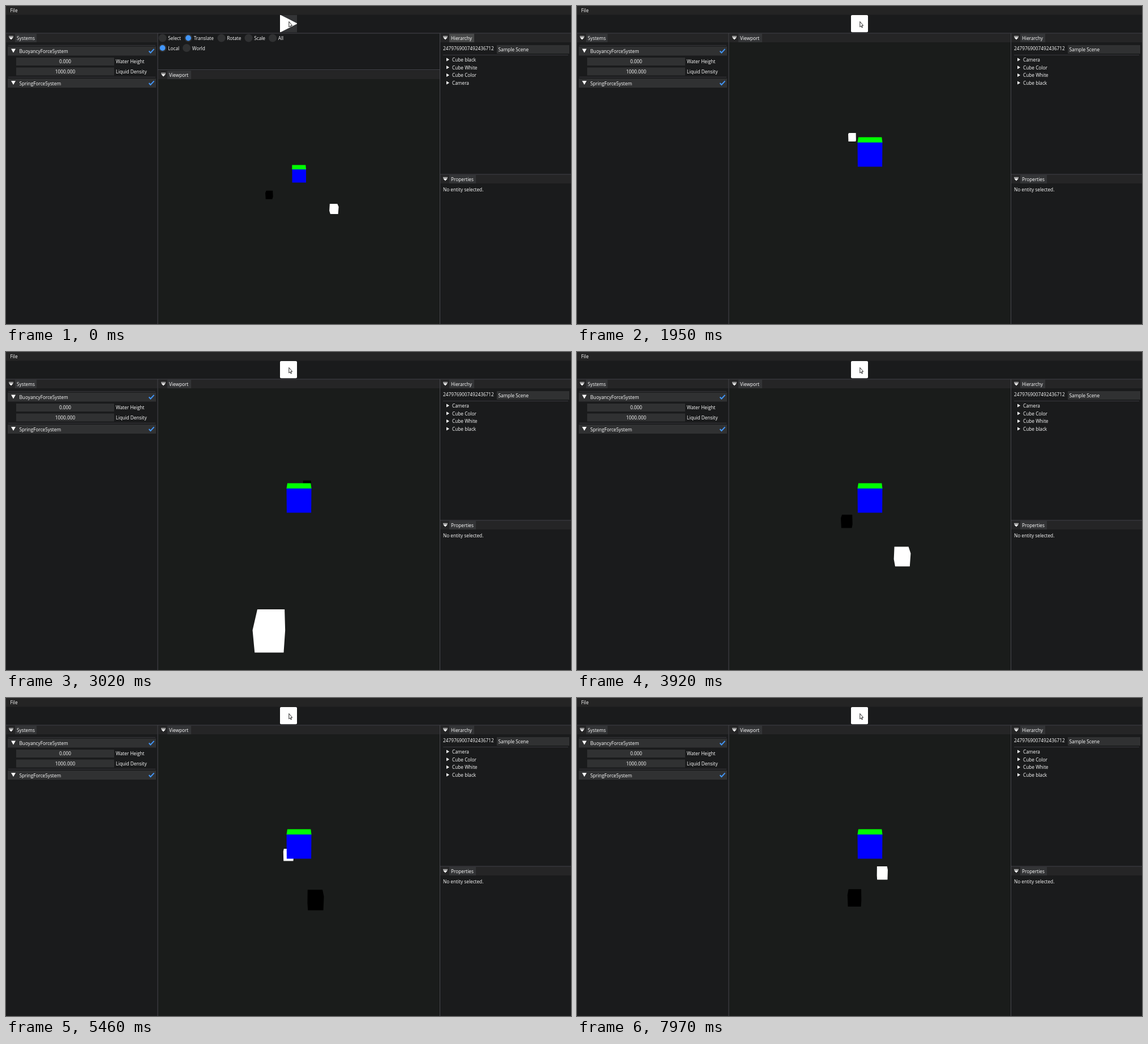
An HTML page with a canvas that plays this animation: 998 px wide and 561 px high, repeating every 8000 ms.

```html
<!DOCTYPE html>
<html>
<head>
<meta charset="utf-8">
<title>Scene editor</title>
<style>
  html, body { margin: 0; width: 100%; height: 100%; overflow: hidden; background: #1a1b1c; }
  canvas { display: block; }
</style>
</head>
<body>
<canvas id="stage" width="998" height="561"></canvas>
<script>
const ctx = document.getElementById('stage').getContext('2d');
const LOOP = 8, PLAY_AT = 0.7;
const PANEL = '#1a1b1c', BAR = '#252526', TAB = '#333436', TAB_FOCUS = '#474848', FRAME = '#303132';
const LINE = '#47474d', RULE = '#38383d', BLUE = '#4296fa', VIEW = '#1a1c1b';

// ---------- drawing helpers ----------
function rect(x, y, w, h, color) {
  ctx.fillStyle = color;
  ctx.fillRect(x, y, w, h);
}
function trace(points) {
  points.forEach(([x, y], i) => i ? ctx.lineTo(x, y) : ctx.moveTo(x, y));
  ctx.closePath();
}
function poly(points, color) {
  ctx.fillStyle = color;
  ctx.beginPath();
  trace(points);
  ctx.fill();
}
function disc(x, y, r, color) {
  ctx.fillStyle = color;
  ctx.beginPath();
  ctx.arc(x, y, r, 0, 7);
  ctx.fill();
}
function label(text, x, midY, align = 'left') {
  ctx.font = '8.28px "Open Sans", "Noto Sans", sans-serif';
  ctx.textAlign = align;
  ctx.fillStyle = '#fff';
  ctx.fillText(text, x, midY + 3);
}
const arrowDown = (x, y) => poly([[x - 4, y - 3.5], [x + 4, y - 3.5], [x, y + 3.5]], '#fff');
const arrowRight = (x, y) => poly([[x - 2, y - 3], [x + 3, y], [x - 2, y + 3]], '#fff');

function titleBar(x, y, w, text, tabWidth, tabColor = TAB) {
  rect(x, y, w, 15, BAR);
  rect(x + 16, y, tabWidth, 15, tabColor);
  rect(x + 5, y + 4, 8, 1, '#fff');
  poly([[x + 5, y + 6], [x + 13, y + 6], [x + 9, y + 10.5]], '#fff');
  label(text, x + 19, y + 8);
}
function header(y, text) {
  rect(3, y, 262, 16, FRAME);
  arrowDown(13, y + 7.5);
  label(text, 23.5, y + 8.5);
  ctx.strokeStyle = BLUE;
  ctx.lineWidth = 1.9;
  ctx.beginPath();
  ctx.moveTo(252.5, y + 8);
  ctx.lineTo(255.3, y + 11);
  ctx.lineTo(261.5, y + 4.3);
  ctx.stroke();
}
function field(y, value, name) {
  rect(18, y, 173, 14, FRAME);
  label(value, 104.5, y + 7.2, 'center');
  label(name, 194, y + 7.2);
}
function radio(x, y, text, on) {
  disc(x, y, 7, FRAME);
  if (on) disc(x, y, 4.9, BLUE);
  label(text, x + 9.7, y + 0.5);
}

// ---------- editor panels ----------
function drawPanels(playing) {
  rect(0, 0, 998, 561, PANEL);
  rect(0, 0, 998, 15.5, '#242424');
  label('File', 7.5, 8.3);

  titleBar(0, 49, 268, 'Systems', 38);
  rect(4, 69, 260, 1, RULE);
  header(71.5, 'BuoyancyForceSystem');
  field(91, '0.000', 'Water Height');
  field(108.5, '1000.000', 'Liquid Density');
  rect(4, 125, 260, 1, RULE);
  header(128, 'SpringForceSystem');

  titleBar(767, 49, 231, 'Hierarchy', 44, playing ? TAB : TAB_FOCUS);
  label('2479769007492436712', 772, 75);
  rect(867, 69, 128, 15, FRAME);
  label('Sample Scene', 869.5, 77);
  rect(772, 86, 221, 1, RULE);
  const items = ['Cube black', 'Cube White', 'Cube Color', 'Camera'];
  if (playing) items.reverse();
  items.forEach((name, i) => {
    arrowRight(780, 94.5 + i * 13.7);
    label(name, 788, 95 + i * 13.7);
  });
  titleBar(767, 298, 231, 'Properties', 47);
  label('No entity selected.', 772, 324.3);

  if (playing) {
    rect(269, 49, 498, 512, VIEW);
    titleBar(269, 49, 498, 'Viewport', 42);
  } else {
    radio(276.5, 56.5, 'Select');
    radio(322, 56.5, 'Translate', true);
    radio(380.5, 56.5, 'Rotate');
    radio(428.5, 56.5, 'Scale');
    radio(471, 56.5, 'All');
    radio(276.5, 74, 'Local', true);
    radio(319, 74, 'World');
    rect(269, 114, 498, 447, VIEW);
    titleBar(269, 114, 498, 'Viewport', 42);
    rect(268, 112, 499, 1, LINE);
  }
  rect(0, 47.5, 998, 1, LINE);
  rect(767, 296.5, 231, 1, LINE);
  rect(267.5, 48, 1, 513, LINE);
  rect(766, 48, 1, 513, LINE);
}

function drawPlayButton(playing) {
  if (playing) {
    ctx.fillStyle = '#fff';
    ctx.beginPath();
    ctx.roundRect(484, 16, 30, 30.3, 2);
    ctx.fill();
  } else {
    rect(484, 16, 30, 30.3, TAB);
    poly([[484, 16], [485.5, 16], [514, 30.5], [514, 31.5], [485.5, 46], [484, 46]], '#fff');
  }
  poly([[499.8, 27.5], [499.8, 37], [501.8, 35.2], [503.2, 38.2], [504.4, 37.6], [503.1, 34.7], [505.6, 34.4]], '#fff');
  ctx.strokeStyle = '#111';
  ctx.lineWidth = 0.9;
  ctx.stroke();
}

// ---------- motion: two cubes swing opposite each other round a bobbing centre ----------
// Half turns since `start`, the first lasting about `step` seconds and later ones longer.
function halfTurns(t, start, step, slowing) {
  return (Math.sqrt(step * step + 4 * slowing * (t - start)) - step) / (2 * slowing);
}
function swing(t, size, damping, turns) {
  return -size * Math.exp(-damping * (t - 1.95)) * Math.sin(Math.PI * turns);
}
function poseAt(t) {
  const windUp = Math.min(1, (t - PLAY_AT) / 0.4);
  return {
    side: swing(t, 3.35, 0.17, halfTurns(t, 1.5, 1.68, 0.055)),
    depth: windUp * swing(t, 17, 0.19, halfTurns(t, 2.5, 1.51, 0.07)),
    height: 0.15 + 0.75 * Math.cos(1.9 * (t - 4.35)) - 0.72 * Math.exp(-((t - 2.5) ** 2)),
    distance: 19 + 0.3 * t
  };
}
const REST_POSE = { side: 4.55, depth: -2.6, height: -0.04, distance: 30 };

// ---------- perspective view ----------
const PITCH = 0.389, SIN = Math.sin(PITCH), COS = Math.cos(PITCH);
const PLAY_VIEW = { top: 64, midY: 312.5, focal: 430, blueZ: 20.5 };
const EDIT_VIEW = { top: 129, midY: 345, focal: 374, blueZ: 36 };

function makeCube(pose, sign, color) {
  return {
    x: sign * pose.side,
    y: pose.height - sign * pose.depth * SIN,
    z: pose.distance + sign * pose.depth * COS,
    color
  };
}
function cubeFaces() {
  const square = [[-0.5, -0.5], [0.5, -0.5], [0.5, 0.5], [-0.5, 0.5]];
  return [-0.5, 0.5].flatMap(s => [
    square.map(([a, b]) => [s, a, b]),
    square.map(([a, b]) => [a, s, b]),
    square.map(([a, b]) => [a, b, s])
  ]);
}
const FACES = cubeFaces();

function signedArea(points) {
  return points.reduce((sum, [x, y], i) => {
    const [nextX, nextY] = points[(i + 1) % points.length];
    return sum + x * nextY - nextX * y;
  }, 0);
}
function drawCube(cube, view) {
  if (cube.z < 1.5) return;
  const project = ([x, y, z]) => {
    const scale = view.focal / (cube.z + y * SIN + z * COS);
    return [517.5 + (cube.x + x) * scale, view.midY + (cube.y + y * COS - z * SIN) * scale];
  };
  // Equal winding merges all faces into one seamless outline.
  ctx.fillStyle = cube.color;
  ctx.beginPath();
  for (const face of FACES) {
    const points = face.map(project);
    trace(signedArea(points) < 0 ? points.reverse() : points);
  }
  ctx.fill();
}

function drawBlueCube(playing) {
  if (playing) {
    poly([[495.5, 240.3], [539.5, 240.3], [539.1, 283.6], [495.9, 283.6]], '#00f');
    poly([[497, 231.5], [538.3, 231.5], [539.5, 240.7], [495.5, 240.7]], '#0f0');
  } else {
    rect(505.5, 288, 24.5, 23.5, '#00f');
    poly([[505.3, 280.5], [529.3, 280.5], [530, 288.3], [505.3, 288.3]], '#0f0');
  }
}

function drawScene(t, playing) {
  const view = playing ? PLAY_VIEW : EDIT_VIEW;
  const pose = playing ? poseAt(t) : REST_POSE;
  const cubes = [makeCube(pose, 1, '#fff'), makeCube(pose, -1, '#000')].sort((a, b) => b.z - a.z);

  ctx.save();
  ctx.beginPath();
  ctx.rect(269, view.top, 497, 561 - view.top);
  ctx.clip();
  cubes.filter(c => c.z >= view.blueZ).forEach(c => drawCube(c, view));
  drawBlueCube(playing);
  cubes.filter(c => c.z < view.blueZ).forEach(c => drawCube(c, view));
  ctx.restore();
}

function frame() {
  const t = performance.now() / 1000 % LOOP;
  const playing = t >= PLAY_AT;
  drawPanels(playing);
  drawScene(t, playing);
  drawPlayButton(playing);
  requestAnimationFrame(frame);
}
frame();
</script>
</body>
</html>
```
